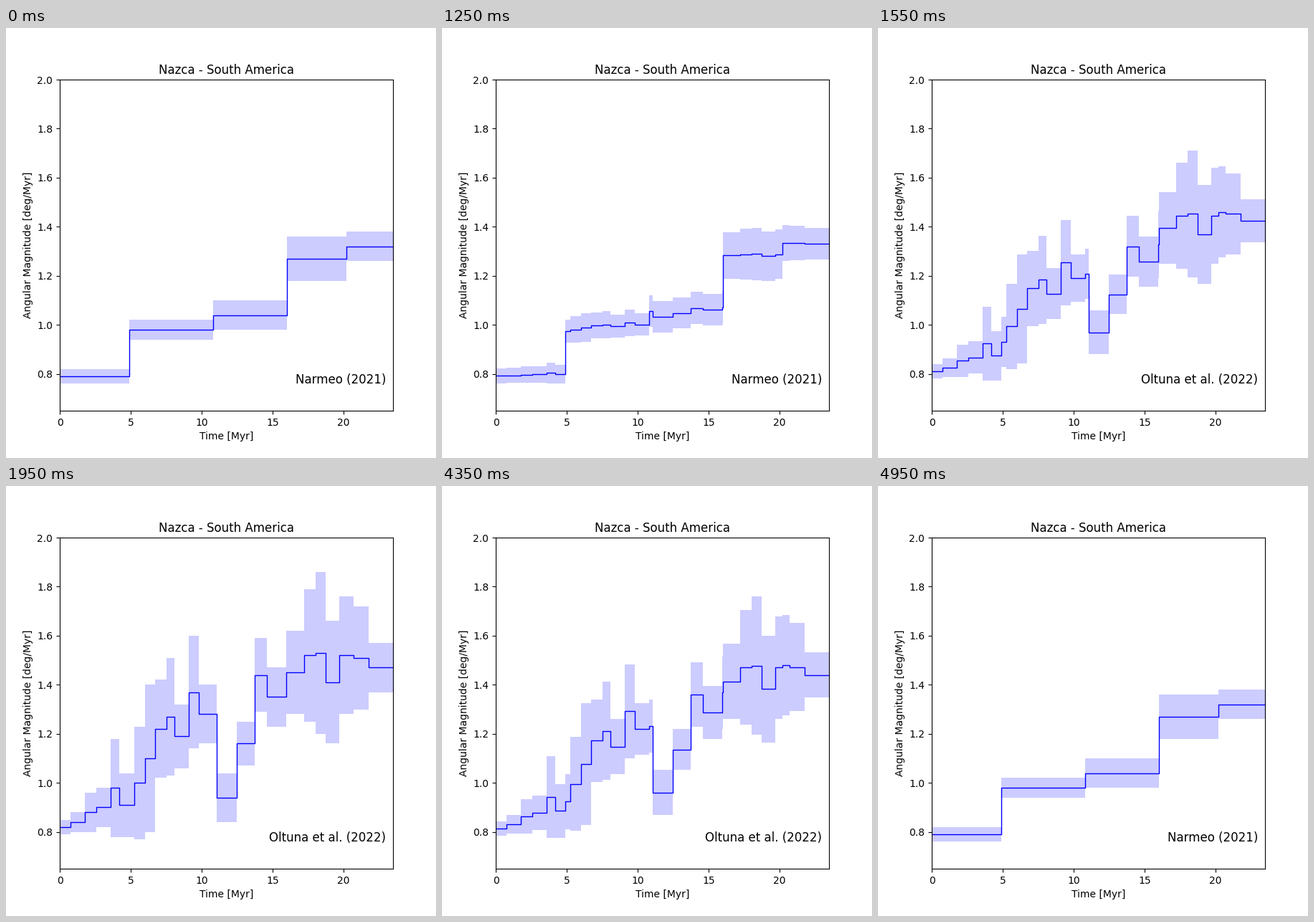
Animation, 600 px wide and 600 px high, one loop 6 s. Source, as a matplotlib script:

```python
import numpy as np
import matplotlib.pyplot as plt
from matplotlib.animation import FuncAnimation

INTERVAL = 50
FRAMES = 120
STEPS = 19              # steps in one transition
RISE, FALL = 20, 80     # frames where the transitions start
X_MAX = 23.5

# Coarse model: stage starts, magnitudes, half-widths of the band
COARSE_LABEL = "Narmeo (2021)"
coarse_t = np.array([0, 4.9, 10.8, 16.0, 20.2])
coarse_mag = np.array([0.79, 0.98, 1.04, 1.27, 1.32])
coarse_err = np.array([0.03, 0.04, 0.06, 0.09, 0.06])

# Fine model
FINE_LABEL = "Oltuna et al. (2022)"
fine_t = np.array([0, 0.781, 1.778, 2.581, 3.596, 4.187, 5.235, 6.033,
                   6.733, 7.528, 8.108, 9.105, 9.786, 11.056, 12.474, 13.739,
                   14.609, 15.974, 17.235, 18.056, 18.748, 19.722, 20.709, 21.767])
fine_mag = np.array([0.82, 0.84, 0.88, 0.90, 0.98, 0.91, 1.00, 1.10,
                     1.22, 1.27, 1.19, 1.37, 1.28, 0.94, 1.16, 1.44,
                     1.35, 1.45, 1.52, 1.53, 1.41, 1.52, 1.51, 1.47])
fine_err = np.array([0.03, 0.04, 0.08, 0.08, 0.20, 0.13, 0.23, 0.30,
                     0.20, 0.24, 0.13, 0.23, 0.12, 0.10, 0.09, 0.15,
                     0.12, 0.17, 0.27, 0.33, 0.25, 0.24, 0.21, 0.10])

# Both models resampled on the union of their stages
starts = np.union1d(coarse_t, fine_t)
step_x = np.repeat(np.append(starts, X_MAX), 2)[1:-1]


def resample(t, values):
    return np.repeat(values[np.searchsorted(t, starts, side="right") - 1], 2)


mag_a, err_a = resample(coarse_t, coarse_mag), resample(coarse_t, coarse_err)
mag_b, err_b = resample(fine_t, fine_mag), resample(fine_t, fine_err)


def ease(x):
    """Cubic ease in and out."""
    return 4 * x**3 if x < 0.5 else 1 - 4 * (1 - x)**3


def blend(frame):
    """Weight of the fine model at a frame."""
    start = RISE if frame < FALL else FALL
    w = ease(min(max((frame - start) / STEPS, 0), 1))
    return w if frame < FALL else 1 - w


plt.rcParams["font.family"] = "DejaVu Sans"
fig, ax = plt.subplots(figsize=(6, 6), dpi=100)
fig.subplots_adjust(left=0.125, right=0.9, bottom=0.11, top=0.88)
ax.set(xlim=(0, X_MAX), ylim=(0.65, 2.0), xlabel="Time [Myr]",
       ylabel="Angular Magnitude [deg/Myr]", title="Nazca - South America")
ax.set_xticks(range(0, 21, 5))
ax.set_yticks(np.arange(0.8, 2.01, 0.2))

band = ax.fill_between(step_x, mag_a - err_a, mag_a + err_a,
                       facecolor="blue", alpha=0.2, linewidth=0)
line, = ax.plot(step_x, mag_a, color="blue", linewidth=1)
label = ax.text(23, 0.75, COARSE_LABEL, fontsize=12, ha="right", va="bottom")


def update(frame):
    w = blend(frame)
    mag = mag_a + (mag_b - mag_a) * w
    err = err_a + (err_b - err_a) * w
    upper = np.column_stack([step_x, mag + err])
    lower = np.column_stack([step_x, mag - err])
    band.set_verts([np.vstack([upper, lower[::-1]])])
    line.set_ydata(mag)
    label.set_text(FINE_LABEL if w > 0.5 else COARSE_LABEL)
    return band, line, label


anim = FuncAnimation(fig, update, frames=FRAMES, interval=INTERVAL,
                     repeat=True, repeat_delay=0)
plt.show()
```
